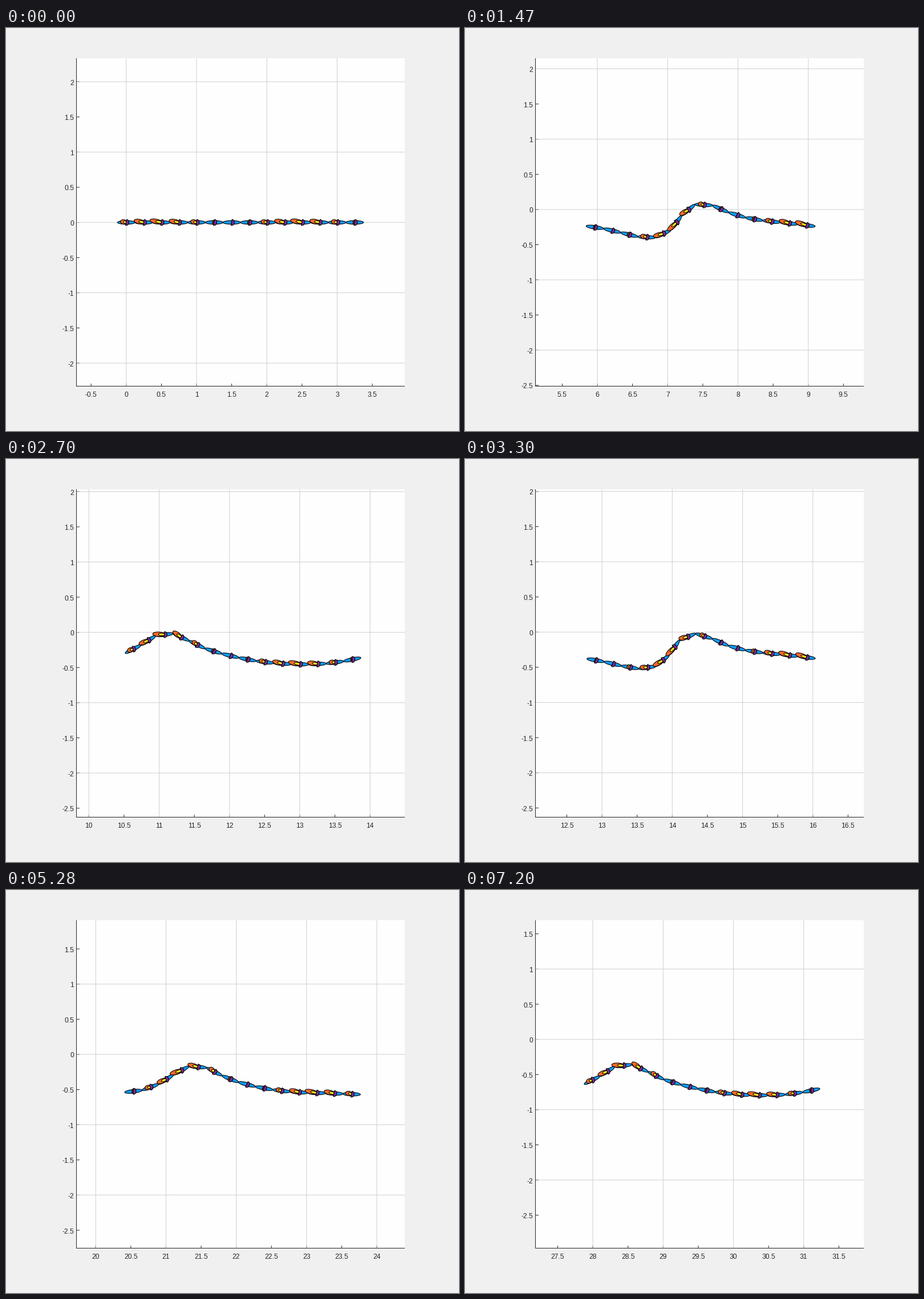
These frames come from a looping animation (794 px wide and 706 px high, 7230 ms). A matplotlib script:

```python
import numpy as np
import matplotlib.pyplot as plt
from matplotlib.animation import FuncAnimation
from matplotlib.collections import LineCollection, PolyCollection
from matplotlib.patches import Rectangle

W, H, DPI = 794, 706, 100
FRAMES, CYCLE, LINKS = 241, 30, 14
LEFT, RIGHT, TOP, BOTTOM = 124, 699, 53, 628
CX, CY = 411, 340.6              # view centre in pixels
HALF = 7 / 3                     # half the visible range in units
SCALE = (RIGHT - LEFT) / (2 * HALF)
LINK = SCALE / 4
TILT = np.radians(-11)           # jet axis relative to its link
PT = 72 / DPI

plt.rcParams["font.family"] = "Liberation Sans"
idx = np.arange(LINKS)

# Path of the centre of mass
TIMES = np.array([0, 27, 70, 110, 145, 176, 240])
PATH_X = [1.625, 4.861, 9.926, 14.387, 18.469, 22.06, 29.517]
PATH_Y = np.array([0, -0.133, -0.312, -0.303, -0.3555, -0.427, -0.641])


def sway(n):
    return -0.05 - 0.05 * np.cos(2 * np.pi * (n - 8) / CYCLE)


def centre(n):
    x = np.interp(n, TIMES, PATH_X)
    y = np.interp(n, TIMES, PATH_Y - sway(TIMES)) + sway(n)
    return x, y


def hump(t):
    """Headings of one hump that is born at the head and runs to the tail."""
    u = idx - max(14.75 - 0.41 * t, 1.9)
    rise = np.interp(t, [-6, 0, 10, 20, 26, 40, 48], [0, 9, 54, 57, 40, 48, 0])
    fall = np.interp(t, [0, 10, 20, 30, 40, 50], [0, 8, 24, 30, 26, 0])
    back = 1.7 + 0.25 * max(t - 20, 0)
    up = np.exp(-((u + 1.7) / np.where(u < -1.7, back, 1.4)) ** 2)
    v = u - 0.9
    down = np.where(v < 0, np.exp(-(v / 1.3) ** 2), 1 / (1 + (v / 1.4) ** 2))
    return rise * up - fall * down


def headings(n):
    phase = n % CYCLE
    ripple = np.cos(2 * np.pi * ((idx - 7) / 8 + n / CYCLE))
    nod = np.cos(2 * np.pi * (n - 6) / CYCLE) * np.exp(-((idx - 13) / 1.5) ** 2)
    deg = -8 + 0.7 * idx - 8 * (1 - idx / 13) * ripple + 7 * nod
    deg += sum(hump(phase + k * CYCLE) for k in (-1, 0, 1))
    return np.radians(deg) * (1 - np.exp(-(n / 20) ** 2))


def place(shape, angle, pos):
    """Rotate a shape (y up) and put it at a pixel position (y down)."""
    c, s = np.cos(angle), np.sin(angle)
    x, y = shape[:, 0], shape[:, 1]
    return np.column_stack([pos[0] + c * x - s * y, pos[1] - s * x - c * y])


def ellipse(x0, x1, half):
    t = np.linspace(0, 2 * np.pi, 40)
    return np.column_stack([(x0 + x1) / 2 + (x1 - x0) / 2 * np.cos(t),
                            half * np.sin(t)])


def dome(x0, x1, half):
    t = np.linspace(-np.pi / 2, np.pi / 2, 20)
    return np.column_stack([x0 + (x1 - x0) * np.abs(np.cos(t)) ** 0.8,
                            half * np.sin(t)])


BODY = ellipse(-LINK / 2, LINK / 2, 3.2)
NOZZLE = dome(-0.3, 4.6, 5.2)

fig = plt.figure(figsize=(W / DPI, H / DPI), dpi=DPI, facecolor="#f0f0f0")
ax = fig.add_axes([0, 0, 1, 1])
ax.set_xlim(0, W)
ax.set_ylim(H, 0)
ax.axis("off")
ax.add_patch(Rectangle((LEFT, TOP), RIGHT - LEFT, BOTTOM - TOP,
                       fc="#fefefe", ec="none", zorder=0))


def lines(color, z):
    lc = LineCollection([], colors=color, linewidths=PT, zorder=z, snap=False)
    return ax.add_collection(lc, autolim=False)


def polys(color, z):
    pc = PolyCollection([], facecolors=color, edgecolors="black",
                        linewidths=1.1 * PT, zorder=z)
    return ax.add_collection(pc, autolim=False)


def labels(ha):
    return [ax.text(0, 0, "", ha=ha, va="center_baseline", color="#262626",
                    fontsize=12 * PT) for _ in range(10)]


ticks = lines("#262626", 1)
grid = lines("#d0d0d0", 2)
frame = lines("#262626", 3)
frame.set_segments([[(LEFT - .5, TOP), (LEFT - .5, BOTTOM)],
                    [(LEFT, BOTTOM - .5), (RIGHT, BOTTOM - .5)]])
bodies = polys("#0f9bf7", 4)
flames = polys("#ff6a2b", 5)
cores = polys("#fff31a", 6)
nozzles = polys("#7d2a90", 7)
x_text, y_text = labels("center"), labels("right")


def halves(c):
    """Multiples of one half inside the view around c."""
    return range(int(np.ceil(2 * (c - HALF))), int(np.floor(2 * (c + HALF))) + 1)


def draw_axes(cx, cy):
    major, minor = [], []
    for t in x_text + y_text:
        t.set_text("")
    for t, k in zip(x_text, halves(cx)):
        p = CX + (k / 2 - cx) * SCALE
        t.set_text(f"{k / 2:g}")
        t.set_position((p, 641.5))
        minor.append([(p, BOTTOM), (p, BOTTOM - 5)])
        if k % 2 == 0:
            major.append([(p, TOP), (p, BOTTOM)])
    for t, k in zip(y_text, halves(cy)):
        p = CY - (k / 2 - cy) * SCALE
        t.set_text(f"{k / 2:g}")
        t.set_position((119, p + 1))
        minor.append([(LEFT, p), (LEFT + 5, p)])
        if k % 2 == 0:
            major.append([(LEFT, p), (RIGHT, p)])
    ticks.set_segments(minor)
    grid.set_segments(major)


def draw_worm(n):
    th = headings(n)
    step = LINK * np.column_stack([np.cos(th), -np.sin(th)])
    pos = np.cumsum(step, axis=0) - step / 2
    pos += (CX, CY) - pos.mean(axis=0)
    power = (1 + np.sin(2 * np.pi * (idx / 8 + n / CYCLE))) / 2
    jet = th + TILT

    bodies.set_verts([place(BODY, a, p) for a, p in zip(th, pos)])
    nozzles.set_verts([place(NOZZLE, a, p) for a, p in zip(jet, pos)])
    for coll, size, half in ((flames, 20.5, 3.9), (cores, 10.5, 2.2)):
        coll.set_verts([place(ellipse(-size * q, 2 * q, half), a, p)
                        for q, a, p in zip(power, jet, pos)])


def update(n):
    draw_axes(*centre(n))
    draw_worm(n)
    return []


anim = FuncAnimation(fig, update, frames=FRAMES, interval=30,
                     repeat=True, repeat_delay=0, blit=False)
plt.show()
```
